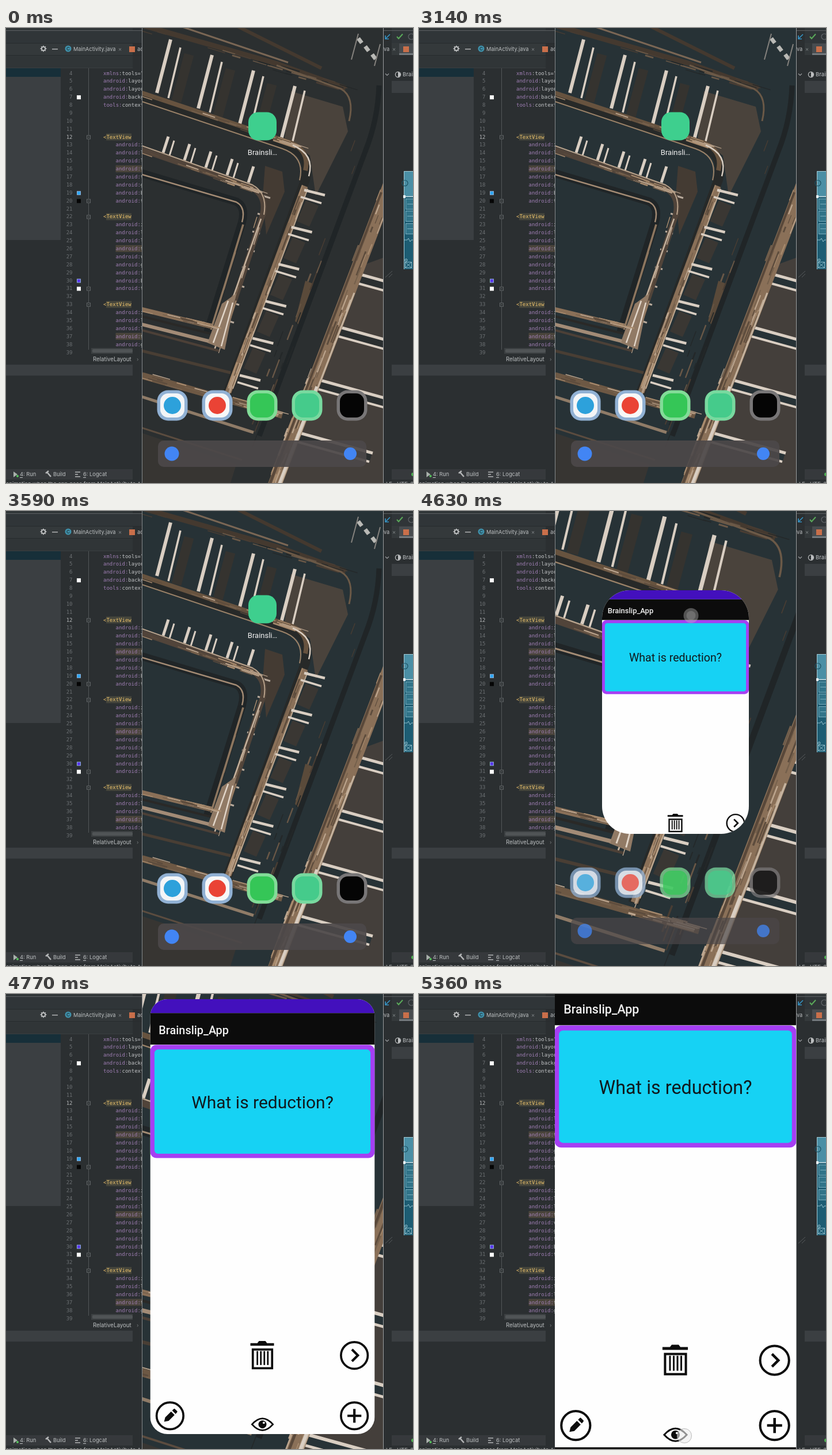
Write an HTML page with a canvas that moves like this. It is 707 px wide and 792 px high and loops after 8 s.

```html
<!DOCTYPE html>
<html lang="en">
<head>
<meta charset="utf-8">
<title>Opening an app</title>
<style>
  html, body { margin: 0; width: 100%; height: 100%; overflow: hidden; background: #2b2f31; }
  canvas { display: block; }
</style>
</head>
<body>
<canvas id="stage" width="707" height="792"></canvas>
<script>
const ctx = document.getElementById('stage').getContext('2d');
const LOOP = 8000;
const PHONE = { x: 236, w: 419, mid: 445.5 };
const UI = 'Inter, sans-serif', MONO = '"DejaVu Sans Mono", monospace', ROBOTO = 'Roboto, sans-serif';

function rect(x, y, w, h, color) {
  ctx.fillStyle = color;
  ctx.fillRect(x, y, w, h);
}
function round(x, y, w, h, r, color) {
  ctx.fillStyle = color;
  ctx.beginPath();
  ctx.roundRect(x, y, w, h, r);
  ctx.fill();
}
function tile(cx, cy, size, r, color) {
  round(cx - size / 2, cy - size / 2, size, size, r, color);
}
function disc(x, y, r, color) {
  ctx.fillStyle = color;
  ctx.beginPath();
  ctx.arc(x, y, r, 0, Math.PI * 2);
  ctx.fill();
}
function ring(x, y, r, width, color) {
  ctx.strokeStyle = color;
  ctx.lineWidth = width;
  ctx.beginPath();
  ctx.arc(x, y, r, 0, Math.PI * 2);
  ctx.stroke();
}
function stroke(path, width, color) {
  ctx.strokeStyle = color;
  ctx.lineWidth = width;
  ctx.stroke(new Path2D(path));
}
function shape(path, color) {
  ctx.fillStyle = color;
  ctx.fill(new Path2D(path));
}
function text(str, x, y, size, color, family = UI, align = 'left', weight = 400) {
  ctx.font = `${weight} ${size}px ${family}`;
  ctx.textAlign = align;
  ctx.fillStyle = color;
  ctx.fillText(str, x, y);
}

// ---- Editor window behind the phone ----

const lineY = n => 78.5 + (n - 4) * 13.886;
const INDENT = 190.5, CHAR = 5.42;

function attribute(n, x, prefix, name, marked) {
  const y = lineY(n);
  if (marked) rect(x, y - 6, 46, 12, '#4a443b');
  text(prefix, x, y + 3, 9, '#a07fb5', MONO);
  text(name, x + prefix.length * CHAR, y + 3, 9, '#c3c5c7', MONO);
}

function drawCode() {
  for (let n = 4; n <= 39; n++) {
    text(n, 115.5, lineY(n) + 3, 9, n === 12 ? '#b5b7b8' : '#6c7073', MONO, 'right');
  }
  rect(143, 70, 1, 490, '#525658');
  for (const n of [12, 20, 22, 31, 33]) {
    rect(140, lineY(n) - 3, 7, 7, '#2b2f31');
    ctx.strokeStyle = '#64686a';
    ctx.lineWidth = 1;
    ctx.strokeRect(140.5, lineY(n) - 2.5, 6, 6);
    rect(142, lineY(n), 3, 1, '#64686a');
  }
  attribute(4, 169, 'xmlns', ':tools="');
  attribute(5, 169, 'android:', 'layout_width');
  attribute(6, 169, 'android:', 'layout_height');
  attribute(7, 169, 'android:', 'background');
  attribute(8, 169, 'tools:', 'context');
  const blocks = [[12, 'illttgbt'], [22, 'illtvgtbt'], [33, 'illtg']];
  for (const [start, names] of blocks) {
    rect(174, lineY(start) - 6, 44, 12, '#46463c');
    text('<TextView', 169, lineY(start) + 3, 9, '#e8bf6a', MONO);
    [...names].forEach((c, i) => attribute(start + 1 + i, INDENT, 'android:', c, i === 3));
  }
  const swatches = [[7, '#ffffff'], [19, '#2da7f5'], [20, '#050505'], [30, '#5a35f0'], [31, '#ffffff']];
  for (const [n, color] of swatches) {
    rect(123, lineY(n) - 3, 7, 7, n === 19 || n === 30 ? '#8fb2d8' : color);
    rect(124, lineY(n) - 2, 5, 5, color);
  }
}

function drawLeftPane() {
  rect(0, 0, 220, 4, '#313638');
  rect(0, 5, 236, 21, '#303538');
  rect(0, 26, 220, 21, '#34393b');
  rect(0, 47, 220, 22, '#303537');
  rect(0, 4, 236, 1, '#5d6163');
  rect(0, 26, 236, 1, '#272b2d');
  rect(0, 47, 236, 1, '#272b2d');
  rect(0, 69, 220, 1, '#3a3e40');
  rect(0, 70, 95, 15, '#172f39');
  rect(0, 85, 95, 284, '#3b3f42');

  ring(65, 36, 3.2, 2, '#b8babb');
  for (let i = 0; i < 8; i++) {
    const a = i * Math.PI / 4;
    disc(65 + 4.6 * Math.cos(a), 36 + 4.6 * Math.sin(a), 1, '#b8babb');
  }
  rect(80, 36, 10, 1.4, '#b8babb');
  disc(108, 36, 5.5, '#3f91ab');
  text('C', 108, 39, 8, '#20363f', UI, 'center', 600);
  text('MainActivity.java', 117, 39.5, 9.2, '#bdc0c2');
  text('×', 198, 39.5, 10, '#7c8082', UI, 'center');
  rect(214, 32, 10, 10, '#c96f4a');
  text('activity', 228, 39.5, 9.2, '#bdc0c2');

  drawCode();

  rect(148, 557, 72, 10, '#3c4042');
  round(150, 559, 70, 6, 2, '#505456');
  text('RelativeLayout', 151, 580, 9.7, '#bdc0c2');
  text('›', 227, 580, 9, '#777b7d');
  rect(0, 586, 220, 19, '#3b3f42');
  rect(0, 768, 220, 18, '#36393c');
  shape('M13 772 L20 777 L13 782Z', '#a9b0ab');
  disc(20, 780, 2, '#55c45c');
  text('4: Run', 24, 780, 9.3, '#bdc0c2');
  rect(24, 782, 5, 1, '#bdc0c2');
  stroke('M69 775 L74 771 M71 773 L78 781', 2.5, '#b5b7b8');
  text('Build', 82, 780, 9.3, '#bdc0c2');
  stroke('M120 773H129 M120 777H125 M120 781H129', 1.6, '#b5b7b8');
  text('6: Logcat', 134, 780, 9.3, '#bdc0c2');
  rect(134, 782, 5, 1, '#bdc0c2');
  text('animation when the app goes from MainActivity to Add', 0, 797, 9.5, '#b5b7b8');
}

function drawRightPane() {
  rect(655, 0, 52, 792, '#2b2f31');
  rect(670, 0, 37, 4, '#313638');
  rect(655, 4, 52, 1, '#5d6163');
  rect(670, 5, 37, 21, '#303538');
  rect(670, 26, 37, 21, '#34393b');
  rect(683, 27, 24, 20, '#484c4f');
  rect(683, 44, 24, 3, '#747a7e');
  stroke('M667 11 L659 19 M659 13 V19 H665', 1.7, '#3592c4');
  stroke('M679 15 L682 18.5 L689 10.5', 2, '#5aa95a');
  ring(704, 15, 5, 1.2, '#62666a');
  text('va', 656, 39.5, 9.2, '#bdc0c2');
  text('×', 674, 39.5, 10, '#7c8082', UI, 'center');
  rect(690, 32, 10, 10, '#c96f4a');
  stroke('M659 79.5 L662 82.5 L665 79.5', 1.2, '#9a9d9f');
  ring(681, 81, 4.6, 1.2, '#c1c3c4');
  shape('M681 77 A4 4 0 0 1 681 85Z', '#c1c3c4');
  text('Brainslip', 689, 84, 9.5, '#c4c7c9');
  rect(670, 92, 37, 21, '#3b3f42');

  rect(691, 249, 16, 171, '#1d5d73');
  rect(691, 249, 16, 45, '#4b8fa5');
  ctx.strokeStyle = '#79aebe';
  ctx.lineWidth = 1;
  for (const y of [297, 318, 340]) {
    rect(694, y, 13, 18, '#317489');
    ctx.strokeRect(694.5, y + .5, 16, 18);
    rect(697, y + 9, 10, 1, '#79aebe');
  }
  stroke('M691.5 420 V249.5 H707', 1, '#a5ccd6');
  stroke('M691 293.5 H707', 1.5, '#d5e5ea');
  ring(693, 270, 5, 1.2, '#1d5365');
  rect(690, 291, 4, 5, '#e6eff2');
  stroke('M692 369 H697 L699 366 L702 372 L704 369 H707', 1, '#8cbac7');
  ctx.strokeRect(693.5, 407.5, 11, 10);
  stroke('M694 408 L704 417 M704 408 L694 417', 1, '#8cbac7');
  ring(695, 404, 2, 1, '#a5ccd6');
  stroke('M659 434 L671 423 M665 434 L671 428', 1, '#565a5c');

  rect(670, 586, 37, 19, '#3b3f42');
  rect(670, 768, 37, 18, '#36393c');
  disc(707, 777, 3, '#4caf50');
  text('LF   UTF-8', 660, 797, 9.5, '#b5b7b8');
}

// ---- Phone home screen ----

function bars(count, x, y, stepX, stepY, dx, dy, width, color) {
  ctx.strokeStyle = color;
  ctx.lineWidth = width;
  ctx.beginPath();
  for (let i = 0; i < count; i++) {
    ctx.moveTo(x + i * stepX, y + i * stepY);
    ctx.lineTo(x + i * stepX + dx, y + i * stepY + dy);
  }
  ctx.stroke();
}

// Worn wood: short seeded streaks along a beam from (x1, y1) to (x2, y2).
function grain(x1, y1, x2, y2, width, count, colors) {
  const length = Math.hypot(x2 - x1, y2 - y1);
  const ux = (x2 - x1) / length, uy = (y2 - y1) / length;
  let seed = 7;
  const random = () => (seed = seed * 16807 % 2147483647) / 2147483647;
  for (let i = 0; i < count; i++) {
    const along = random() * length, side = (random() - .5) * width;
    const size = 10 + random() * 35;
    const x = x1 + ux * along - uy * side, y = y1 + uy * along + ux * side;
    bars(1, x, y, 0, 0, ux * size, uy * size, 1 + random() * 2, colors[i % colors.length]);
  }
}

function drawWallpaper(base, zoom) {
  const tan = '#8a7058', brown = '#44392f', pale = '#d9cec2', dark = '#202527';
  const wood = ['#a88b6e', '#5d4c3d', '#bda68f', '#75604c'];
  const shade = ['#493d33', '#242829', '#6a5847'];
  rect(PHONE.x, 0, PHONE.w, 792, base);
  ctx.save();
  ctx.translate(PHONE.mid, 396);
  ctx.scale(zoom, zoom);
  ctx.translate(-PHONE.mid, -396);

  // landings and treads
  shape('M495 110 L585 137 L594 180 L538 292 L528 222 L484 192Z', '#4a433c');
  bars(3, 318, 46, 72, 26, -22, 82, 17, '#35332f');
  shape('M450 240 L480 250 L484 285 L452 360 L446 292Z', '#443b33');
  bars(5, 532, 305, -23, 64, -16, 36, 24, '#3a3733');
  shape('M655 400 L622 412 L480 792 L655 792Z', '#443f3b');
  shape('M236 705 L400 760 L390 792 L236 792Z', '#373532');
  shape('M520 440 L536 446 L512 520 L502 510Z', '#5a4a3a');

  // upper flight
  stroke('M236 -5 L470 62 L590 105', 9, brown);
  grain(236, 0, 580, 102, 12, 26, shade);
  stroke('M300 -4 L490 60', 3, '#7a6654');
  stroke('M400 -4 L548 70', 6, brown);
  stroke('M470 65 L582 106 Q606 120 596 162', 3, '#6b5947');
  stroke('M648 100 Q646 160 624 215 L440 710', 9, dark);
  grain(618, 200, 430, 700, 30, 26, shade);
  bars(4, 286, 20, 72, 27, -24, 93, 6, pale);
  bars(4, 303, 34, 72, 25, -21, 88, 3.5, pale);
  bars(3, 612, 18, 12, 14, 6, 8, 7, '#b9b9b5');
  stroke('M612 10 L600 55 M650 28 L640 66', 2, '#85827e');

  // middle rail
  stroke('M236 120 L495 207 Q531 222 520 264 L385 635', 16, '#272928');
  stroke('M236 113 L495 200 Q528 214 520 248', 8, '#67533f');
  grain(236, 115, 495, 202, 9, 26, wood);
  stroke('M519 275 L386 634', 11, tan);
  grain(519, 275, 390, 624, 10, 45, wood);
  stroke('M524 280 L394 628', 2, '#c0aa92');
  stroke('M236 128 L480 210 Q520 224 510 265', 2, '#9b8268');
  stroke('M498 204 Q537 220 526 258', 2.5, pale);
  bars(6, 518, 282, -22.4, 64.5, 36, 9, 4.5, pale);
  bars(6, 512, 294, -22, 64.5, 36, 11, 3.5, pale);
  bars(8, 446, 292, -9, 31, 13, 4, 3, '#b8aa9c');

  // inner flights
  bars(5, 282, 189, 37, 13, -9, 28, 5, pale);
  bars(4, 292, 196, 37, 13, -8, 26, 3, pale);
  bars(5, 266, 256, 29, 9, -3, 10, 5, pale);
  stroke('M236 212 L424 277 Q454 290 446 325 L370 555', 10, '#51443a');
  grain(236, 214, 424, 280, 9, 24, wood);
  grain(440, 330, 376, 535, 10, 28, wood);
  stroke('M236 205 L428 273 Q455 288 448 325', 2, '#b9a38c');
  stroke('M443 332 L362 560', 2.5, '#c5b29e');
  stroke('M236 253 L400 302 Q417 311 410 338 L350 530', 14, dark);
  stroke('M236 255 L400 303 Q417 312 410 338', 2.5, '#a38b74');
  stroke('M412 342 L378 455 M398 390 L356 525', 3.5, '#8d765f');
  shape('M375 480 L400 462 L380 560 L350 548Z', '#917a65');
  stroke('M386 475 L360 548 M394 478 L374 554', 2.5, '#e1d5c8');
  stroke('M236 490 L355 519', 8, tan);
  grain(236, 490, 345, 516, 7, 18, wood);
  stroke('M236 502 L355 532', 4, '#2a2927');
  stroke('M236 516 L352 545', 6, '#a28b76');
  stroke('M236 526 L370 562', 4, '#4c4037');

  // lower flight
  stroke('M236 562 L390 600', 5, '#493e34');
  stroke('M236 605 L480 674', 12, '#6d5844');
  grain(236, 604, 460, 667, 12, 34, wood);
  stroke('M236 642 L430 704', 5, '#8f7b67');
  stroke('M236 696 L410 752', 3, '#5b4c3f');

  // right rail
  bars(4, 609, 435, -35, 92, 130, 36, 13, base);
  bars(4, 612, 428, -35, 92, 130, 36, 5, pale);
  bars(4, 606, 443, -35, 92, 130, 36, 4, pale);
  shape('M700 152 L655 270 L440 832 L464 836 L655 336 L700 220Z', tan);
  grain(660, 285, 462, 800, 24, 90, wood);
  stroke('M652 286 L448 822', 4, '#59483a');
  stroke('M605 461 L463 832', 3, '#c5b39f');
  stroke('M540 624 L472 800', 5, pale);
  ctx.restore();
}

function drawDockIcon(x, y, halo, face, mark) {
  tile(x, y, 53, 19, halo);
  tile(x, y, 42, 14, face);
  if (mark) disc(x, y, 15, mark);
}

function drawHome(t, opening) {
  drawWallpaper(t < 3140 ? '#2b2f30' : '#273236', opening ? 1.2 : 1);
  ctx.save();
  if (opening) {
    ctx.translate(0, -10);
    ctx.globalAlpha = 0.75;
  } else {
    tile(445.5, 171, 49, 17, '#3ecf8e');
    text('Brainsli…', PHONE.mid, 221, 13, '#f4f4f4', ROBOTO, 'center');
  }
  drawDockIcon(289, 657, '#91b1d4', '#f3f5f7', '#2da1db');
  drawDockIcon(367, 657, '#91b1d4', '#f7f7f7', '#ea4335');
  drawDockIcon(445, 657, '#82dc98', '#35c657');
  drawDockIcon(523, 657, '#78d99f', '#45cb8b');
  drawDockIcon(601, 657, '#787677', '#050505');
  round(264, 718, 362, 46, 10, 'rgba(76,72,73,.92)');
  disc(288, 741, 12.5, '#4285f4');
  disc(598, 741, 11, '#4285f4');
  ctx.restore();
}

// ---- App window ----

const INK = '#0c0c0c';

function drawApp() {
  rect(0, 0, 419, 830, '#fefefe');
  rect(0, 0, 419, 26, '#4310bd');
  rect(0, 26, 419, 59, INK);
  text('Brainslip_App', 16, 65, 21.3, '#f1f1f1', ROBOTO, 'left', 500);
  round(0, 85.5, 419, 211.5, 12, '#a53ff3');
  round(8, 94, 403, 195, 7, '#16d2f4');
  text('What is reduction?', 209.5, 204.5, 32.2, '#10191d', ROBOTO, 'center');

  // bin
  shape('M200 643 L203 639 H215 L218 643 H231 V648 H187 V643Z', INK);
  ctx.strokeStyle = INK;
  ctx.lineWidth = 4;
  ctx.strokeRect(191.5, 655, 36, 35);
  for (let i = 0; i < 4; i++) rect(198.5 + i * 6.5, 658, 3, 26, INK);

  for (const [x, y] of [[381, 666], [37, 779], [381, 779]]) ring(x, y, 25, 4, INK);
  stroke('M376.5 655 L387.5 666 L376.5 677', 4.5, INK);
  stroke('M368 779 H394 M381 766 V792', 4.5, INK);
  shape('M26 790 L28 782 L39 771 L45.5 777.5 L34.5 788.5Z M41 769 L44 766 Q45 765 46 766 L50.5 770.5 Q51 771.5 50 772.5 L47.5 775.5Z', INK);

  // eye
  stroke('M190 795 Q209.5 773 229 795 Q209.5 817 190 795Z', 3, INK);
  disc(209.5, 795, 7.5, INK);
  disc(212, 792, 2, '#fefefe');
}

const POSES = [
  { from: 4630, scale: 0.6086, top: 138, height: 424, radius: 48 },
  { from: 4770, scale: 0.931, top: 9, height: 757, radius: 30 },
  { from: 4920, scale: 1.004, top: -31, height: 820, radius: 0 },
];
const isOpen = pose => pose === POSES.at(-1);

function drawWindow({ scale, top, height, radius }) {
  const left = PHONE.mid - 209.5 * scale;
  ctx.save();
  ctx.beginPath();
  ctx.roundRect(left, top, 419 * scale, height, radius);
  ctx.clip();
  ctx.translate(left, top);
  ctx.scale(scale, scale);
  drawApp();
  ctx.restore();
}

function drawTouch(t) {
  if (t >= 4480 && t < 4630) {
    disc(473, 183, 11.5, 'rgba(225,230,228,.75)');
  } else if (t >= 4630 && t < 4770) {
    disc(472.5, 182, 13, 'rgba(190,190,190,.4)');
    disc(472.5, 182, 8, 'rgba(190,190,190,.25)');
  } else if (t >= 5360) {
    disc(461, 769, 13, 'rgba(235,235,235,.6)');
    ring(461, 769, 12.5, 1, 'rgba(150,150,150,.6)');
  }
}

function drawPhone(t) {
  const pose = POSES.findLast(p => t >= p.from);
  ctx.save();
  ctx.beginPath();
  ctx.rect(PHONE.x, 0, PHONE.w, 792);
  ctx.clip();
  if (isOpen(pose)) rect(PHONE.x, 0, PHONE.w, 792, '#151515');
  else drawHome(t, Boolean(pose));
  if (pose) drawWindow(pose);
  drawTouch(t);
  ctx.restore();
  rect(655, 0, 1, 792, '#9a9d9f');
  if (!isOpen(pose)) rect(236, 0, 1, 792, '#868a8c');
}

const start = performance.now();
function frame(now) {
  const t = Math.max(0, now - start) % LOOP;
  rect(0, 0, 707, 792, '#2b2f31');
  drawLeftPane();
  drawRightPane();
  drawPhone(t);
  requestAnimationFrame(frame);
}
requestAnimationFrame(frame);
</script>
</body>
</html>
```
